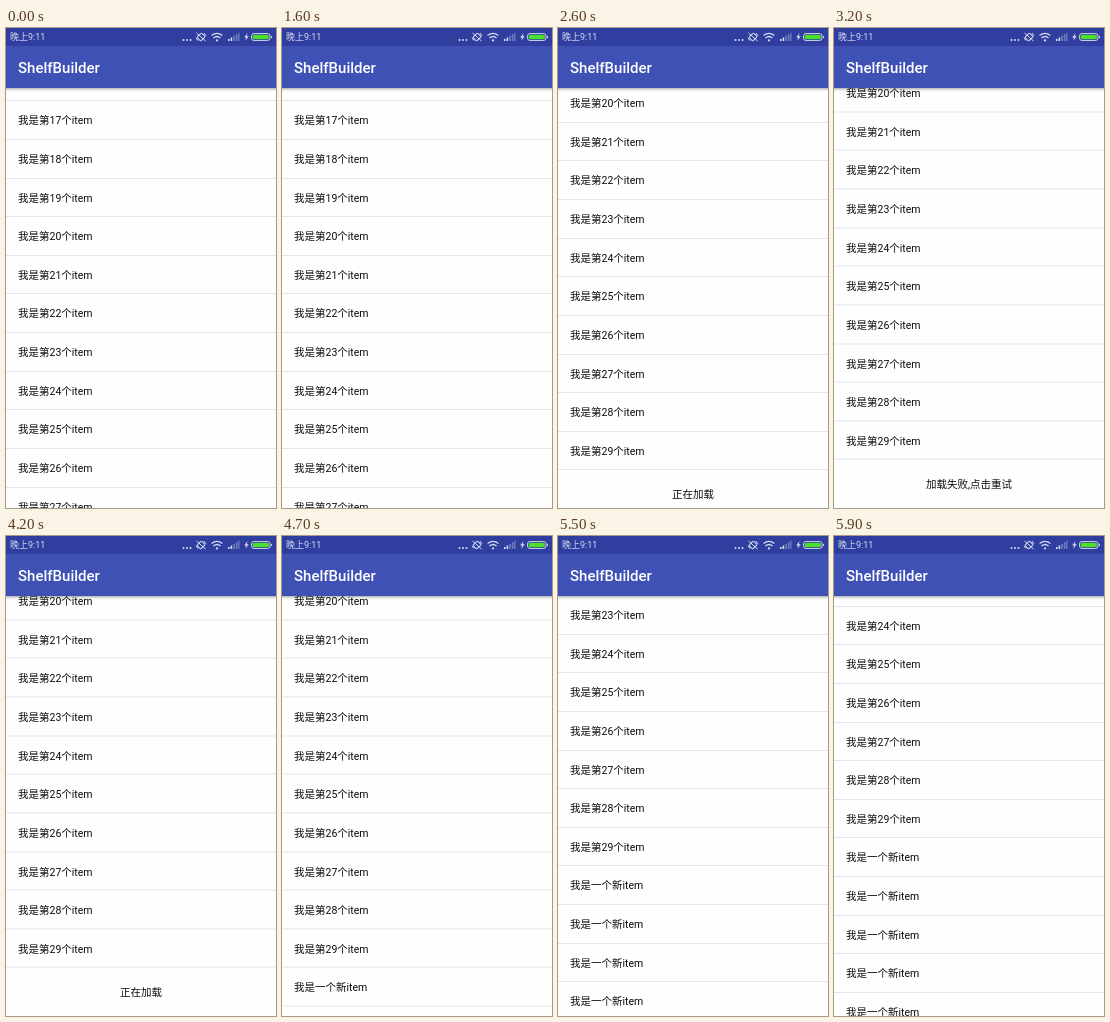
An HTML page that plays this animation: 270 by 480 pixels, repeating every 6.1 s.

```html
<!DOCTYPE html>
<html lang="zh-CN">
<head>
<meta charset="utf-8">
<title>ShelfBuilder</title>
<style>
  html, body { margin: 0; width: 100%; height: 100%; overflow: hidden; background: #fefefe; }
  body { position: relative; font: 10.5px Roboto, "Noto Sans CJK SC", "Noto Sans CJK", sans-serif; color: #0c0c0c; }
  #stage { position: absolute; left: 0; top: 0; width: 270px; height: 480px; overflow: hidden; }
  #list { position: absolute; left: 0; top: 0; width: 270px; }
  .row, #footer { position: absolute; left: 0; width: 270px; box-sizing: border-box; white-space: nowrap; }
  .row { height: 38.625px; padding-left: 12px; line-height: 39.4px; }
  .row::after { content: ""; position: absolute; left: 0; bottom: 0; width: 100%; height: 1px; background: #e3e5e9; }
  #footer { height: 49px; line-height: 49.4px; text-align: center; }
  #status { position: absolute; left: 0; top: 0; width: 270px; height: 18px; background: #303f9f; }
  #clock { position: absolute; left: 4px; top: 0; font-size: 9px; line-height: 19px; color: #d6daf0; }
  #status svg { position: absolute; left: 0; top: 0; }
  #bar { position: absolute; left: 0; top: 18px; width: 270px; height: 42px; padding-left: 12px; box-sizing: border-box;
         background: #3f51b5; color: #fff; font-size: 15px; font-weight: 500; line-height: 44px; }
  #shade { position: absolute; left: 0; top: 60px; width: 270px; height: 4px;
           background: linear-gradient(rgba(0,0,0,.3), rgba(0,0,0,.08) 50%, rgba(0,0,0,0)); }
</style>
</head>
<body>
<div id="stage">
  <div id="list"></div>
  <div id="shade"></div>
  <div id="bar">ShelfBuilder</div>
  <div id="status">
    <span id="clock">晚上9:11</span>
    <svg width="270" height="18" fill="none" stroke="#d6daf0">
      <g fill="#d6daf0" stroke="none">
        <circle cx="177.5" cy="12" r="1"/><circle cx="181" cy="12" r="1"/><circle cx="184.5" cy="12" r="1"/>
        <circle cx="211" cy="12.4" r="1.1"/>
        <path d="M222 11h1.6v2H222zM224.6 9.6h1.6V13h-1.6z"/>
        <path d="M227.2 8h1.6v5h-1.6zM229.8 6.3h1.6V13h-1.6zM232.2 4.8h1.3V13h-1.3z" opacity=".4"/>
        <path d="M241.6 5l-3.4 4.5h2l-1 3.6 3.5-4.8h-2z"/>
      </g>
      <g stroke-width="1">
        <rect x="192.3" y="5.8" width="5.4" height="6.4" rx="1" transform="rotate(45 195 9)"/>
        <path d="M190.5 5l9 8M190 9.8l2 2.8M198 5l2 2.8"/>
      </g>
      <path d="M205.6 7.6q5.4-4.6 10.8 0M207.5 9.9q3.5-2.8 7 0" stroke-width="1.3"/>
      <rect x="245.5" y="5.5" width="18.5" height="7" rx="2.5" stroke-width=".9"/>
      <rect x="246.7" y="6.7" width="16.1" height="4.6" rx="1.5" fill="#4be02c" stroke="none"/>
      <path d="M265.4 7.8v2.4" stroke-width="1"/>
    </svg>
  </div>
</div>
<script>
const LOOP = 6100, STEP = 100, PITCH = 38.625, FIRST = 16, LAST = 29, ADDED = 8;
const list = document.getElementById("list");

// Scroll offsets, one per step, from each start time
const moves = [
  [2000, [12, 41, 69.5, 92, 110, 123, 133, 139, 142.5, 143.5]],
  [5200, [160, 192, 221, 245, 257, 265, 270.5, 273]]
];

const rowTop = n => 73.3 + (n - 17) * PITCH;

function add(text, n) {
  const el = document.createElement("div");
  el.className = "row";
  el.textContent = text;
  el.style.top = rowTop(n) + "px";
  list.append(el);
  return el;
}

for (let n = FIRST; n <= LAST; n++) add(`我是第${n}个item`, n);
const fresh = Array.from({ length: ADDED }, (_, i) => add("我是一个新item", LAST + 1 + i));

const footer = document.createElement("div");
footer.id = "footer";
footer.style.top = rowTop(LAST + 1) + "px";
list.append(footer);

function scrollAt(t) {
  let y = 0;
  for (const [start, steps] of moves) {
    if (t >= start) y = steps[Math.min((t - start) / STEP, steps.length - 1)];
  }
  return y;
}

function draw() {
  const t = Math.floor(performance.now() % LOOP / STEP) * STEP;
  list.style.transform = `translateY(${-scrollAt(t)}px)`;

  const loaded = t >= 4600;
  footer.style.display = loaded ? "none" : "block";
  footer.textContent = t >= 3200 && t < 4200 ? "加载失败,点击重试" : "正在加载";
  footer.style.background = t === 4300 ? "#f3f3f3" : "none";
  for (const el of fresh) {
    el.style.display = loaded ? "block" : "none";
    el.style.opacity = t === 4600 ? .5 : 1;
  }
  requestAnimationFrame(draw);
}
draw();
</script>
</body>
</html>
```
